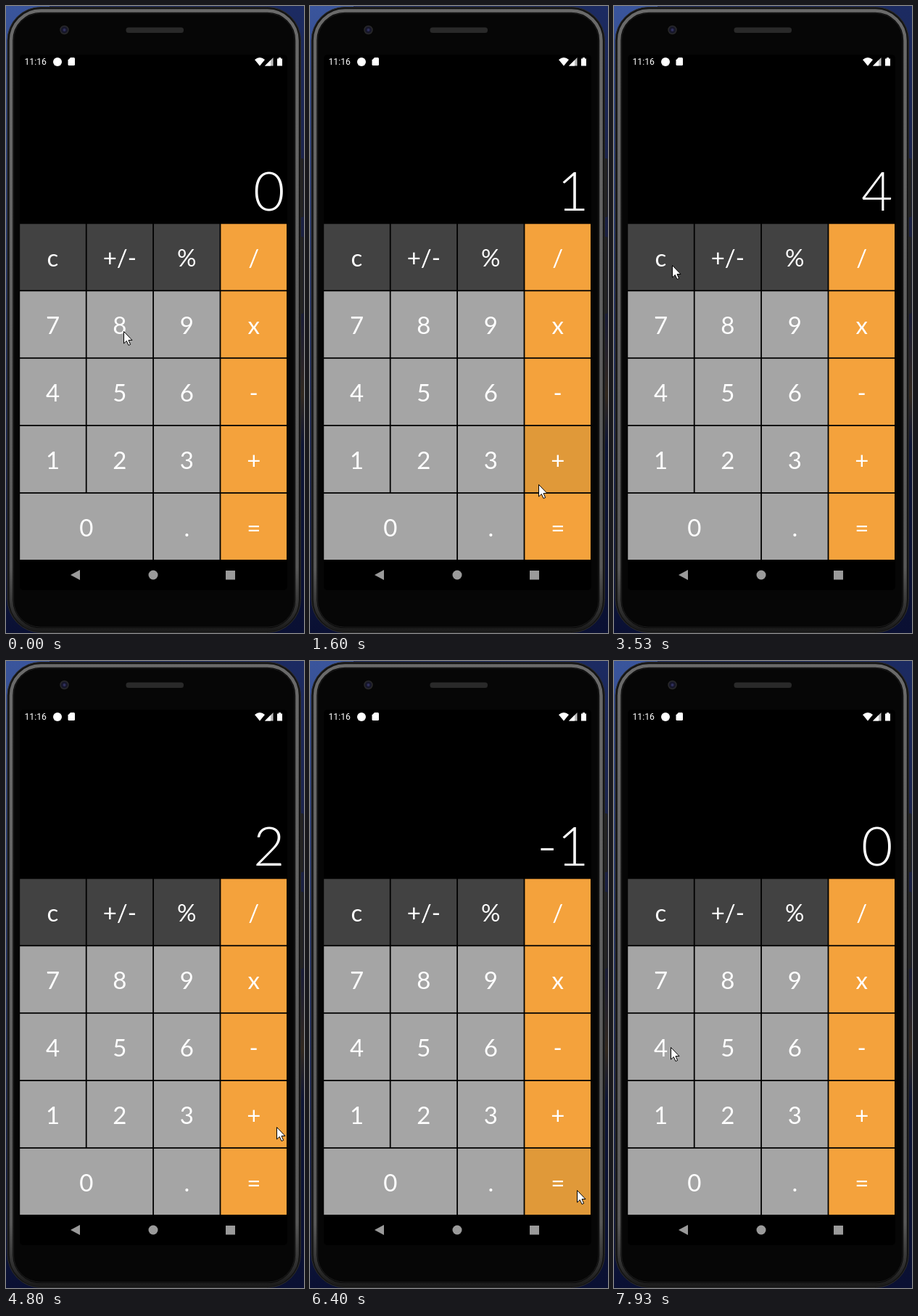
An HTML page that plays this animation: 411x864 px, repeating every 8 s.

```html
<!DOCTYPE html>
<html lang="en">
<head>
<meta charset="utf-8">
<title>Calculator on a phone</title>
<style>
  html, body { margin: 0; width: 100%; height: 100%; overflow: hidden; background: #0a1030; }
  svg { display: block; width: 100vw; height: 100vh; }
  .key { font: 400 33px Lato, sans-serif; fill: #fff; text-anchor: middle; }
  .display { font: 300 75px Lato, sans-serif; fill: #fff; text-anchor: end; }
  .clock { font: 400 12.2px Roboto, sans-serif; fill: #fff; }
</style>
</head>
<body>
<svg viewBox="0 0 411 864" preserveAspectRatio="none">
  <defs>
    <linearGradient id="backdrop" x2="0" y2="1">
      <stop offset="0" stop-color="#1c2b62"/>
      <stop offset=".5" stop-color="#1a1c35"/>
      <stop offset=".62" stop-color="#33291f"/>
      <stop offset=".7" stop-color="#0d1536"/>
      <stop offset="1" stop-color="#0a1033"/>
    </linearGradient>
    <linearGradient id="glow" x2="0" y2="1">
      <stop offset="0" stop-color="#3a559c"/>
      <stop offset="1" stop-color="#0a1033"/>
    </linearGradient>
    <linearGradient id="rim" x2="0" y2="1">
      <stop offset="0" stop-color="#6a6a6a"/>
      <stop offset=".9" stop-color="#585858"/>
      <stop offset="1" stop-color="#1c1c1c"/>
    </linearGradient>
  </defs>

  <rect width="411" height="864" fill="url(#backdrop)"/>
  <rect width="60" height="864" fill="url(#glow)"/>
  <g fill="#222">
    <rect x="405" y="210" width="5.5" height="81" rx="2"/>
    <rect x="405" y="318" width="5.5" height="106" rx="2"/>
  </g>
  <rect x="2" y="1.500" width="404.500" height="862" rx="46" fill="#141414" stroke="#2c2c2c"/>
  <rect x="7" y="6.500" width="394.500" height="853" rx="41" fill="#060606" stroke="url(#rim)" stroke-width="4.500"/>
  <rect x="10.500" y="10" width="387.500" height="846" rx="37" fill="#060606" stroke="#1d1d1d"/>
  <rect x="165.500" y="29.500" width="79.500" height="7.500" rx="3.500" fill="#292929"/>
  <circle cx="80.500" cy="33" r="5.500" fill="#17172a" stroke="#292929" stroke-width="1.500"/>
  <circle cx="80.500" cy="33" r="2" fill="#30305c"/>
  <rect x="19" y="67" width="369" height="738" rx="5" fill="#000"/>

  <text class="clock" x="25.500" y="81">11:16</text>
  <g fill="#fff">
    <circle cx="71" cy="77" r="6"/>
    <path d="M89 71h4.500q1.500 0 1.500 1.500v8q0 1.500-1.500 1.500h-6.500q-1.500 0-1.500-1.500v-6z"/>
    <path d="M343 74q7-6 14 0l-7 8.500z"/>
    <path d="M368.500 71v11.500h-11.500z" fill="#bdbdbd"/>
    <path d="M365 74.500v8h-8z"/>
    <path d="M376 71h3v1.500h2v10h-7v-10h2z"/>
  </g>

  <g id="keys"></g>
  <text id="display" class="display" x="384.500" y="282"></text>

  <g fill="#9a9a9a">
    <path d="M89 784l13-7v14z"/>
    <circle cx="203" cy="784" r="6.500"/>
    <rect x="303" y="778" width="13" height="12.500"/>
  </g>
  <path id="cursor" d="M.5.5v16.500l3.800-3.500 2.700 6 2.600-1.100-2.600-5.900h5z"
        fill="#fff" stroke="#000" stroke-linejoin="round"/>
</svg>
<script>
  const LOOP = 8000, STEP_RATE = 0.015;
  const GRID = { x: 18.3, y: 299.4, w: 92.4, h: 92.9, gap: 1.8 };
  const COLORS = { top: "#424242", digit: "#a5a5a5", op: "#f4a23c", pressed: "#e09939" };
  const LAYOUT = ["c", "+/-", "%", "/", "7", "8", "9", "x", "4", "5", "6", "-",
                  "1", "2", "3", "+", "0", "", ".", "="];
  const keysGroup = document.getElementById("keys");
  const display = document.getElementById("display");
  const cursor = document.getElementById("cursor");
  const keys = {};

  function add(tag, attrs) {
    const node = document.createElementNS("http://www.w3.org/2000/svg", tag);
    for (const name in attrs) node.setAttribute(name, attrs[name]);
    return keysGroup.appendChild(node);
  }

  LAYOUT.forEach((label, i) => {
    if (!label) return;
    const col = i % 4, row = Math.floor(i / 4);
    const left = GRID.x + col * GRID.w, top = GRID.y + row * GRID.h;
    const width = GRID.w * (label === "0" ? 2 : 1);
    const color = col === 3 ? COLORS.op : row === 0 ? COLORS.top : COLORS.digit;
    const rect = add("rect", {
      x: left + GRID.gap / 2, y: top + GRID.gap / 2,
      width: width - GRID.gap, height: GRID.h - GRID.gap, fill: color
    });
    const x = left + width / 2;
    add("text", { class: "key", x, y: top + 60 }).textContent = label;
    keys[label] = { rect, color, x, y: top + GRID.h / 2 };
  });

  // The pointer glides to a spot near a key's centre, then may press the key.
  const MOVES = [
    { key: "8", leave: 0, arrive: 0, dx: 5, dy: 9 },
    { key: "1", leave: 0, arrive: 4, press: 9 },
    { key: "+", leave: 8, arrive: 12, dx: 9, dy: -35 },
    { key: "+", leave: 15, arrive: 21, dx: -18, dy: 9 },
    { key: "+", leave: 23, arrive: 24, dx: -27, dy: 34, press: 24, hold: 2 },
    { key: "3", leave: 24, arrive: 27, dx: -21, dy: 26, press: 30 },
    { key: "=", leave: 30, arrive: 40, press: 41 },
    { key: "c", leave: 44, arrive: 53, dy: 11, press: 57 },
    { key: "2", leave: 56, arrive: 65, press: 69 },
    { key: "+", leave: 69, arrive: 72, dx: 31, dy: 17 },
    { key: "-", leave: 72, arrive: 75, press: 75 },
    { key: "3", leave: 75, arrive: 81, dx: -10, dy: 31, press: 82 },
    { key: "=", leave: 82, arrive: 91, dx: 26, dy: 12, press: 95, hold: 3 },
    { key: "c", leave: 96, arrive: 106, dx: -8, press: 109 },
    { key: "4", leave: 109, arrive: 119, dx: 13, dy: 0 }
  ];

  const spot = ({ key, dx = 15, dy = 6 }) => [keys[key].x + dx, keys[key].y + dy];

  function pointerAt(step) {
    let place = spot(MOVES[0]);
    for (const move of MOVES) {
      if (step <= move.leave) break;
      const u = Math.min(1, (step - move.leave) / (move.arrive - move.leave));
      const eased = u * u * (3 - 2 * u);
      const goal = spot(move);
      place = place.map((v, i) => v + (goal[i] - v) * eased);
    }
    return place.map(Math.round);
  }

  function calculate(pressed) {
    let shown = 0, stored = 0, op = "";
    for (const key of pressed) {
      if (key === "c") shown = 0;
      else if (key === "=") shown = op === "+" ? stored + shown : stored - shown;
      else if (key === "+" || key === "-") [stored, op] = [shown, key];
      else shown = Number(key);
    }
    return shown;
  }

  function render(ms) {
    const step = Math.floor((ms % LOOP) * STEP_RATE + 0.06);
    const presses = MOVES.filter(move => move.press <= step);
    const latest = presses[presses.length - 1];
    const held = latest && step < latest.press + (latest.hold || 0) ? latest.key : "";
    display.textContent = calculate(presses.map(move => move.key));
    cursor.setAttribute("transform", `translate(${pointerAt(step)})`);
    for (const label in keys) {
      keys[label].rect.setAttribute("fill", label === held ? COLORS.pressed : keys[label].color);
    }
  }

  const start = performance.now();
  function tick() {
    render(performance.now() - start);
    requestAnimationFrame(tick);
  }
  tick();
</script>
</body>
</html>
```
